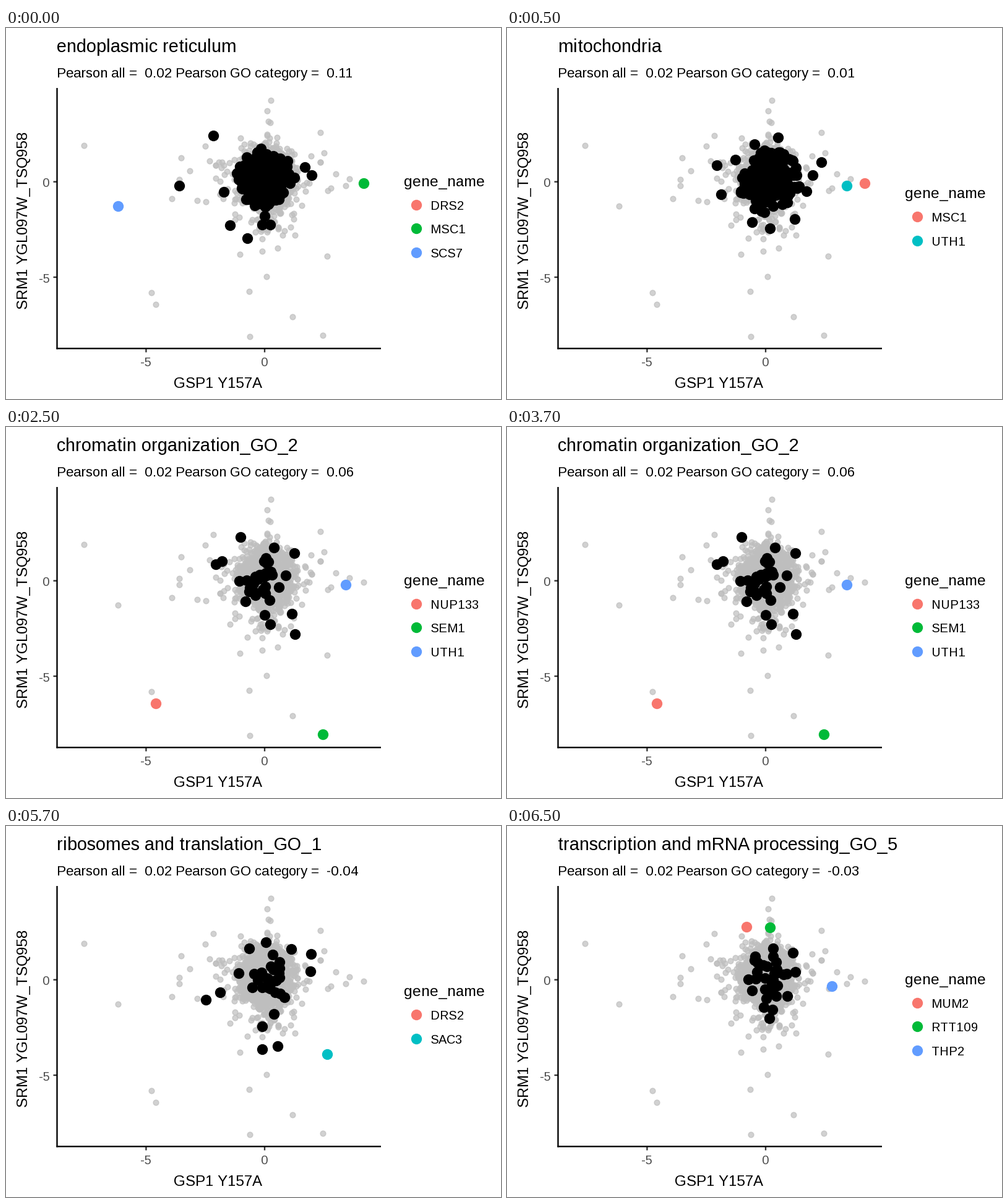
Recreate the animation shown at these times as a matplotlib script. Size 800 px wide and 600 px high, loop 8 s.

```python
import matplotlib.pyplot as plt
import numpy as np
from matplotlib.animation import FuncAnimation

W, H, DPI = 800, 600, 100
PT = 72 / DPI  # points per pixel
RED, GREEN, BLUE, TEAL = "#F8766D", "#00BA38", "#619CFF", "#00BFC4"
GREY = "#BEBEBE"
BIG, SMALL = 7.9, 4.34  # dot radii without the outline

plt.rcParams.update({
    "font.family": "Liberation Sans",
    "text.hinting": "force_autohint",
    "text.hinting_factor": 1,  # whole-pixel letter advances
})
rng = np.random.default_rng(97)


def cloud(n, center, sigma, reach=2.2):
    """Gaussian scatter of n points, cut off at reach sigmas."""
    offsets = rng.normal(0, 1, (4 * n, 2))
    inside = np.hypot(*offsets.T) < reach
    return offsets[inside][:n] * sigma + center


# Lone genes far from the core, in pixels
OUTLIERS = [
    (126, 190), (181, 288), (235, 428), (242, 447), (268, 276), (283, 210),
    (378, 366), (393, 426), (394, 499), (421, 402), (463, 467), (512, 497),
    (519, 369), (428, 117), (422, 134), (508, 169), (533, 236), (555, 244),
    (549, 255), (525, 259), (578, 251),
]

# title, correlation, legend as (name, colour, position),
# outer members, cloud of the other members
SCENES = [
    ("endoplasmic reticulum", "0.11",
     [("DRS2", RED, None), ("MSC1", GREEN, (578, 251)),
      ("SCS7", BLUE, (181, 288))],
     [(335, 174), (280, 255), (362, 319), (390, 340), (418, 304), (427, 318),
      (414, 318), (352, 265), (483, 225), (494, 238)],
     (190, (418, 243), (22, 22))),
    ("mitochondria", "0.01",
     [("MSC1", RED, (578, 251)), ("UTH1", TEAL, (549, 255))],
     [(339, 222), (346, 269), (369, 213), (438, 177), (400, 188), (508, 217),
      (494, 238), (484, 264), (465, 309), (425, 324), (396, 314)],
     (180, (423, 246), (23, 24))),
    ("chromatin organization_GO_2", "0.06",
     [("NUP133", RED, (242, 447)), ("SEM1", GREEN, (512, 497)),
      ("UTH1", BLUE, (549, 255))],
     [(379, 178), (349, 217), (339, 222), (387, 282), (418, 304), (427, 319),
      (462, 302), (467, 335), (466, 204), (433, 195)],
     (30, (415, 245), (22, 18))),
    ("ribosomes and translation_GO_1", "-0.04",
     [("DRS2", RED, None), ("SAC3", TEAL, (519, 369))],
     [(420, 188), (393, 198), (461, 199), (493, 207), (492, 235), (346, 269),
      (323, 281), (376, 238), (433, 304), (414, 324), (414, 361), (439, 356)],
     (24, (421, 248), (18, 20))),
    ("transcription and mRNA processing_GO_5", "-0.03",
     [("MUM2", RED, (387, 163)), ("RTT109", GREEN, (425, 164)),
      ("THP2", BLUE, (525, 259))],
     [(430, 198), (462, 205), (466, 236), (453, 275), (390, 248), (415, 293),
      (429, 297), (424, 311)],
     (24, (422, 244), (16, 20))),
]

fig = plt.figure(figsize=(W / DPI, H / DPI), dpi=DPI, facecolor="white")
ax = fig.add_axes([0, 0, 1, 1])
ax.set(xlim=(0, W), ylim=(H, 0))
ax.axis("off")


def text(x, y, string, size, color="black", **kw):
    return ax.text(x, y, string, fontsize=size * PT, color=color,
                   va="baseline", **kw)


def dots(points, radius, color, alpha=1, z=2):
    x, y = np.transpose(points)
    return ax.scatter(x, y, s=(2 * radius * PT) ** 2, c=color,
                      linewidths=1.57 * PT, edgecolors=color, alpha=alpha,
                      zorder=z)


def line(xs, ys, color="black"):
    ax.plot(xs, ys, color=color, lw=2.37 * PT, solid_capstyle="butt",
            snap=False, zorder=1)


def draw_axes():
    for x, label in ((226.4, "-5"), (418, "0")):
        line([x, x], [518, 524.5], "#333333")
        text(x, 547, label, 19.56, "#4D4D4D", ha="center")
    for y, label in ((248.7, "0"), (403, "-5")):
        line([76.5, 82.5], [y, y], "#333333")
        text(71, y + 8.5, label, 19.56, "#4D4D4D", ha="right")
    line([82.5, 82.5], [97, 519.4])
    line([81.5, 606], [518.3, 518.3])
    text(271, 582, "GSP1 Y157A", 24.44)
    text(35, 455, "SRM1 YGL097W_TSQ958", 24.44, rotation=90,
         rotation_mode="anchor")


def draw_background(members):
    core = cloud(480, (419, 243), (23, 27))
    halo = cloud(170, (421, 247), (34, 43))
    wings = cloud(60, (405, 237), (58, 33))
    tails = cloud(45, (425, 250), (10, 58), 2)
    dots(np.vstack([OUTLIERS, core, halo, wings, tails, *members]),
         SMALL, GREY, 0.7)


def draw_scene(title, correlation, legend, members):
    top = 324.4 - 19.2 * (len(legend) - 1)
    artists = [
        text(82, 39, title, 29.33),
        text(82, 80, "Pearson all =  0.02 Pearson GO category =  "
             + correlation, 22),
        text(643, round(top - 30), "gene_name", 24.44),
        dots(members, BIG, "black", z=3),
    ]
    for i, (name, color, spot) in enumerate(legend):
        y = top + 38.4 * i
        artists += [dots([(662.5, y)], BIG, color),
                    text(686, round(y + 8), name, 19.56)]
        if spot:
            artists.append(dots([spot], BIG, color, z=4))
    return artists


members = [np.vstack([outer, cloud(*inner)]) for *_, outer, inner in SCENES]
draw_axes()
draw_background(members)
scene_artists = [draw_scene(*scene[:3], genes)
                 for scene, genes in zip(SCENES, members)]


def update(n):
    current = (n + 3) // 4  # the first scene shows for one step only
    for i, artists in enumerate(scene_artists):
        for artist in artists:
            artist.set_visible(i == current)
    return []


anim = FuncAnimation(fig, update, frames=16, interval=500,
                     init_func=lambda: update(0), repeat=True, repeat_delay=0)
plt.show()
```
